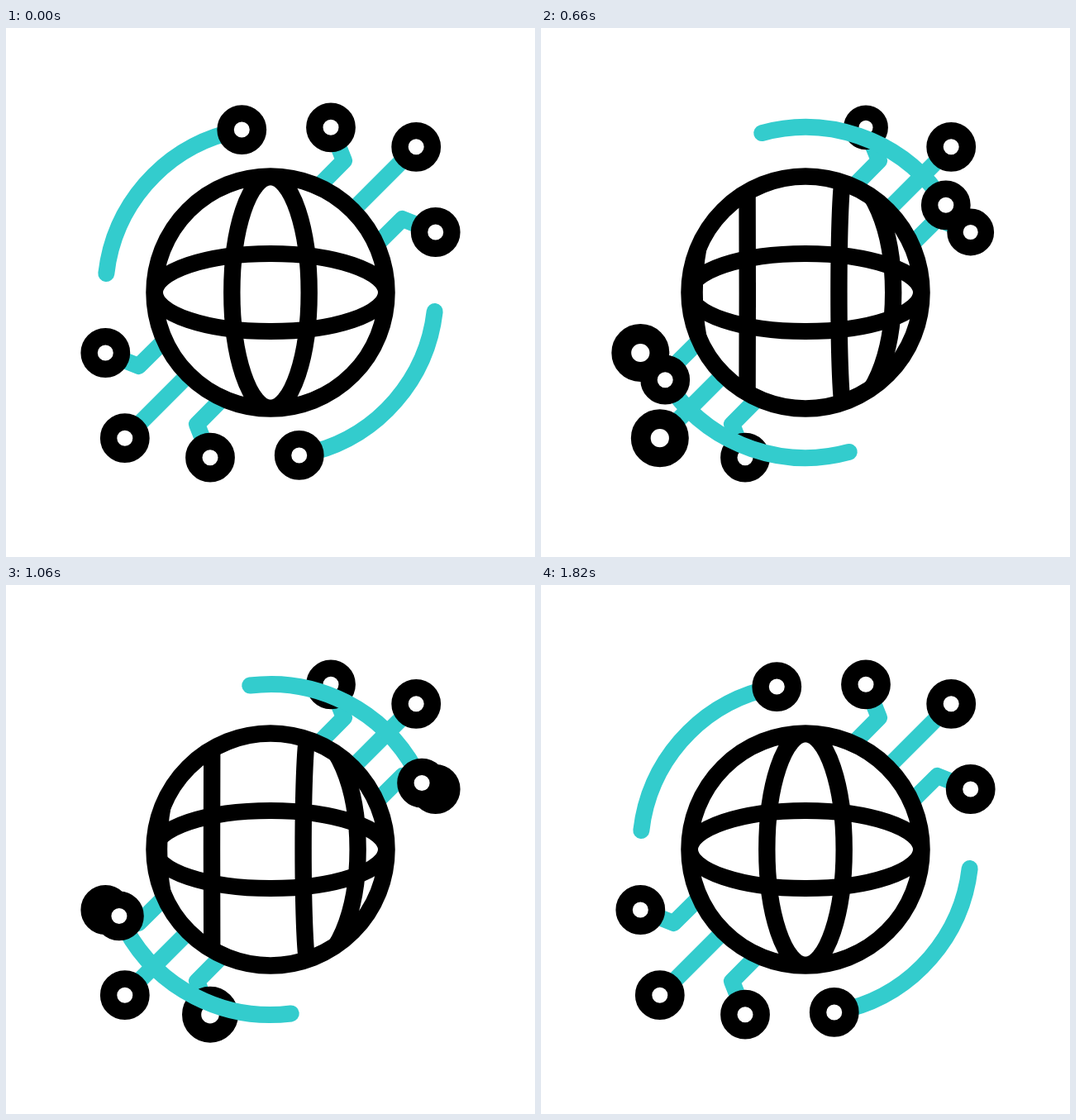
An HTML page with a canvas that plays this animation: 640 by 640 pixels, repeating every 2.44 s.

```html
<!DOCTYPE html>
<html>
<head>
<meta charset="utf-8">
<style>
html, body { margin: 0; width: 100%; height: 100%; overflow: hidden; background: #fff; }
canvas { display: block; }
</style>
</head>
<body>
<canvas id="stage" width="640" height="640"></canvas>
<script>
const ctx = document.getElementById('stage').getContext('2d');
const LOOP = 2440, TEAL = '#33cccd', RAD = Math.PI / 180;

// Smooth curve through [time, value] knots, flat at both ends and at extremes
function curve(knots) {
  const last = knots.length - 1;
  const rate = i => (knots[i + 1][1] - knots[i][1]) / (knots[i + 1][0] - knots[i][0]);
  const slope = knots.map(([t], i) => {
    if (i === 0 || i === last) return 0;
    const a = rate(i - 1), b = rate(i);
    if (a * b <= 0) return 0;
    const before = t - knots[i - 1][0], after = knots[i + 1][0] - t;
    return (after * a + before * b) / (before + after);
  });
  return t => {
    if (t <= knots[0][0]) return knots[0][1];
    if (t >= knots[last][0]) return knots[last][1];
    const i = knots.findIndex(k => k[0] > t) - 1;
    const [t0, v0] = knots[i], [t1, v1] = knots[i + 1];
    const h = t1 - t0, u = (t - t0) / h, w = 1 - u;
    return v0 * w * w * (1 + 2 * u) + v1 * u * u * (3 - 2 * u)
      + h * u * w * (slope[i] * w - slope[i + 1] * u);
  };
}

const orbit = curve([[0, 0], [230, -12], [340, -8.6], [660, 68.1], [920, 200.4],
  [1220, 305.4], [1500, 349.2], [1820, 360]]);
const spin = curve([[340, 0], [660, 0.427], [920, 1.778], [1220, 3.131], [1500, 4.41], [1820, 5]]);
const pulse = curve([[0, 1], [40, 1.03], [120, 1.17], [200, 1.23], [300, 1.12],
  [360, 1], [410, 0.9], [460, 0.95], [520, 1]]);

// Coordinates are relative to the globe's centre; the last point of a branch is its node.
// Each branch has a twin turned by half a circle, with its own start time.
const branches = [
  { points: [[40, -110], [89, -159.5], [73, -199.7]], starts: [250, 770] },
  { points: [[80, -80], [176.2, -176.2]], starts: [300, 540] },
  { points: [[110, -40], [159.5, -89], [199.7, -73]], starts: [200, 540] }
];

function stroke(color, width, path) {
  ctx.beginPath();
  path();
  ctx.strokeStyle = color;
  ctx.lineWidth = width;
  ctx.stroke();
}

function ring(x, y, scale = 1) {
  ctx.beginPath();
  ctx.arc(x, y, 19.7 * scale, 0, 7);
  ctx.fillStyle = '#fff';
  ctx.fill();
  stroke('#000', 20.4 * scale, () => ctx.arc(x, y, 19.7 * scale, 0, 7));
}

// Half ellipse from pole to pole, reaching sideways to belly
function meridian(pole, belly) {
  stroke('#000', 20.4, () =>
    ctx.ellipse(pole, 0, Math.abs(belly - pole), 140, 0, -90 * RAD, 90 * RAD, belly < pole));
}

function globe(phase) {
  ctx.beginPath();
  ctx.arc(0, 0, 140, 0, 7);
  ctx.fillStyle = '#fff';
  ctx.fill();

  ctx.save();
  ctx.clip();
  const gone = 204 * (phase % 1), left = 204 - gone;
  const exitPole = 0.6 * gone - 0.0008 * gone * gone;
  const entryPole = 0.0022 * left * left - 0.86 * left;
  meridian(exitPole, gone - 46.7);
  meridian(exitPole, 46.7 + 0.683 * gone);
  meridian(entryPole, -46.7 - 0.75 * left);
  meridian(entryPole, 46.7 - left);
  ctx.restore();

  stroke('#000', 20, () => ctx.ellipse(0, 0, 140, 47, 0, 0, 7));
  stroke('#000', 20.5, () => ctx.arc(0, 0, 140.5, 0, 7));
}

function draw(t) {
  ctx.setTransform(1, 0, 0, 1, 0, 0);
  ctx.fillStyle = '#fff';
  ctx.fillRect(0, 0, 640, 640);
  ctx.translate(320, 320);
  ctx.lineJoin = ctx.lineCap = 'round';

  for (const { points, starts } of branches) {
    starts.forEach((start, i) => {
      const turned = points.map(([x, y]) => i ? [-x, -y] : [x, y]);
      stroke(TEAL, 20, () => turned.forEach(p => ctx.lineTo(...p)));
      ring(...turned[turned.length - 1], pulse(t - start));
    });
  }

  globe(spin(t));

  for (const base of [-100, 80]) {
    const head = (base + orbit(t)) * RAD;
    stroke(TEAL, 20, () => ctx.arc(0, 0, 200, head - 73.4 * RAD, head - 5 * RAD));
    ring(200 * Math.cos(head), 200 * Math.sin(head));
  }
}

const begin = performance.now();
function frame() {
  const t = (performance.now() - begin) % LOOP;
  draw(Math.floor(t / 20) * 20);
  requestAnimationFrame(frame);
}
frame();
</script>
</body>
</html>
```
